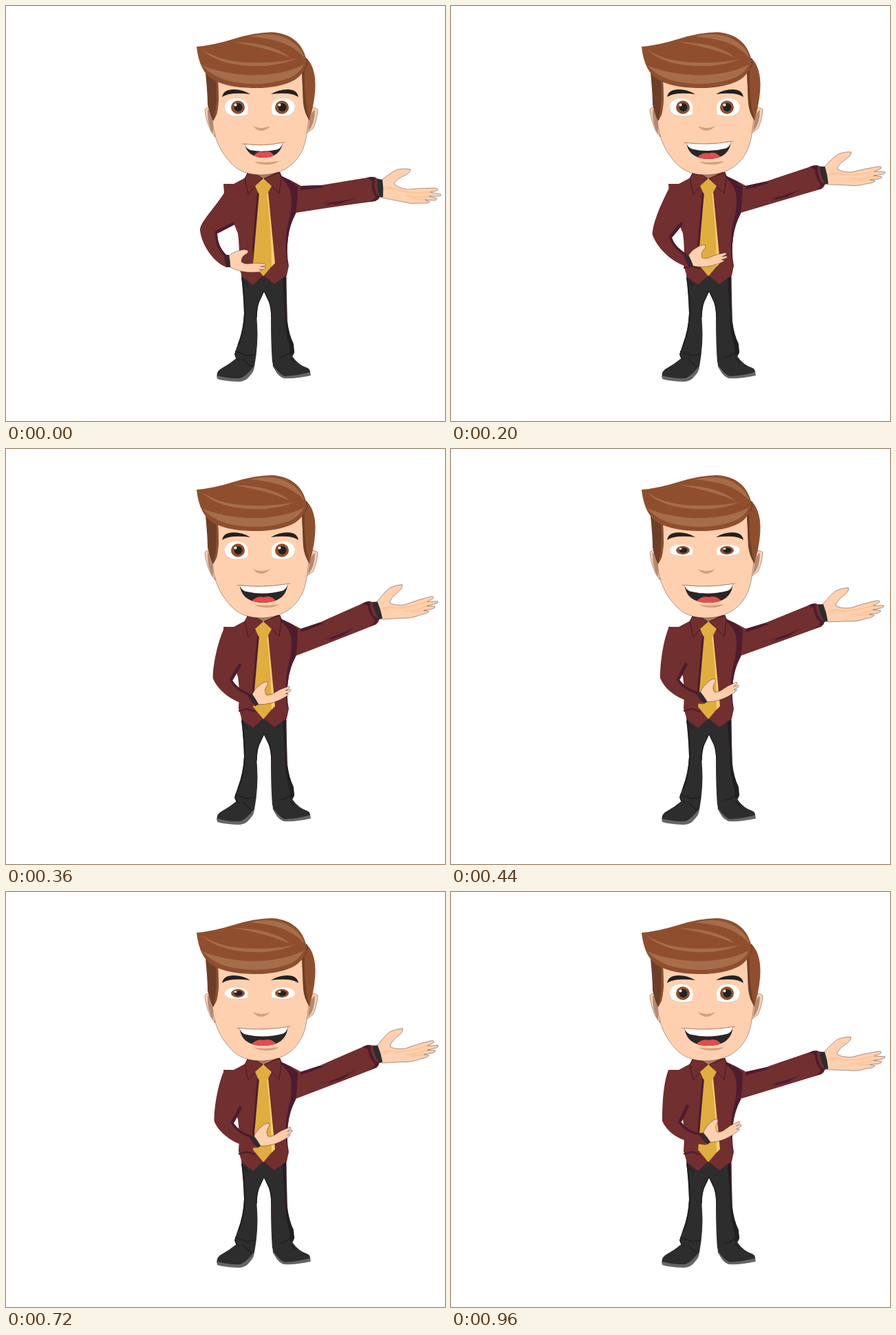
Write an HTML page with a canvas that moves like this. It is 638x602 px and loops after 1.2 s.

```html
<!DOCTYPE html>
<html lang="en">
<head>
<meta charset="utf-8">
<title>Presenter</title>
<style>
html, body { margin: 0; width: 100%; height: 100%; overflow: hidden; background: #fff; }
canvas { display: block; }
</style>
</head>
<body>
<canvas id="stage" width="638" height="602"></canvas>
<script>
const ctx = document.getElementById('stage').getContext('2d');
const LOOP = 1200, STEP = 40, REST = 960;

const skin = '#ffd0b0', tan = '#cfa27c', peach = '#fbc08c', shirt = '#712f2f', plum = '#4d1c30',
  ink = '#2d2d2d', black = '#1f1f1f', hair = '#8f4f2e', hairLight = '#a56d4a',
  hairDark = '#6d3f28', gold = '#dfae3e', goldLight = '#fbcf6f';

const clamp = x => Math.max(0, Math.min(1, x));
const lerp = (a, b, k) => a + (b - a) * k;
const easeOut = (x, p) => 1 - Math.pow(1 - clamp(x), p);

function fill(d, color) {
  ctx.fillStyle = color;
  ctx.fill(new Path2D(d));
}
function line(d, color, width = 1) {
  ctx.strokeStyle = color;
  ctx.lineWidth = width;
  ctx.stroke(new Path2D(d));
}
function shape(d, color, edge = 'rgba(40,25,20,.55)', width = 0.7) {
  fill(d, color);
  line(d, edge, width);
}
function oval(x, y, rx, ry, color) {
  ctx.beginPath();
  ctx.ellipse(x, y, rx, ry, 0, 0, Math.PI * 2);
  ctx.fillStyle = color;
  ctx.fill();
}

// Raised arm: swings up, then sways.
function armAngle(t) {
  if (t > 360) return 12 + 2.5 * Math.cos((t - 360) / 200 * Math.PI);
  const x = t / 360;
  return 14.5 * (0.7 * x + 0.3 * Math.sin(x * Math.PI / 2));
}
// Bent arm: 0 at the hip, 1 in front of the chest.
function bend(t) {
  if (t <= 560) return easeOut(t / 560, 1.5);
  return 1 - 0.083 * (1 - Math.cos((t - 560) / 200 * Math.PI));
}
const eyeOpen = t => clamp((Math.abs(t - 580) - 70) / 110);

function raisedArm(t) {
  const px = 424, py = 265, a = -armAngle(t) * Math.PI / 180;
  const spin = (x, y) => [
    px + (x - px) * Math.cos(a) - (y - py) * Math.sin(a),
    py + (x - px) * Math.sin(a) + (y - py) * Math.cos(a)
  ].join(' ');

  // The sleeve stays fixed at the shoulder and armpit.
  fill(`M408 262L428 261L${spin(458, 260)}Q${spin(500, 253)} ${spin(531, 248)}L${spin(538, 283)}Q${spin(484, 290)} 421 300L408 304Z`, shirt);
  fill(`M424 262L428 261L${spin(458, 260)}L${spin(463, 263)}Q${spin(444, 266)} 424 267Z`, plum);

  ctx.save();
  ctx.translate(px, py);
  ctx.rotate(a);
  ctx.translate(-px, -py);
  shape('M546 252C553 247 560 241 569 237Q580 235 588 237Q588 242 579 246Q566 252 564 258Q570 264 584 266Q602 264 624 264Q630 265 626 268L617 270Q626 272 632 273Q633 276 628 276L615 276L626 279Q627 282 620 282L609 281L616 284Q613 287 603 286Q589 288 576 284Q560 281 546 278Z', skin);
  line('M550 264Q560 261 572 268Q592 272 617 270M582 275Q598 279 615 276M590 279L609 281M553 267Q561 262 566 265', peach, 1.3);
  fill('M538 250L547 252Q549 264 548 277L540 278Z', ink);
  fill('M524 249L529 248Q536 247 540 251Q538 262 543 276Q542 283 534 283L524 284Z', shirt);
  fill('M449 286Q474 286 508 279Q492 284 486 287Q476 287 463 289L470 286Z', plum);
  fill('M526 250Q530 247 537 249Q533 258 538 272L543 277Q540 283 526 284Q536 281 537 277Q530 266 532 254Z', plum);
  ctx.restore();
}

function legs() {
  fill('M342 390Q345 420 346 446Q345 470 337 490L332 505L336 516L361 523Q367 490 365 462Q363 440 368 429L375 414L382 429Q386 440 385 456Q385 490 387 517L414 513L419 503L418 490Q411 476 409 457L407 390Z', ink);
  fill('M402 394L407 392L408 455Q411 476 417 490L419 502L413 508L412 493Q405 472 405 440Z', black);
  line('M407 393Q406 430 408 460', '#432238', 1.2);
  line('M343 394Q347 420 347 446Q346 470 338 492', black, 2);
  line('M375 413L367 430Q364 440 364 452M375 413L383 430Q386 440 386 452M333 501L350 507L363 505M388 513Q402 510 418 500M345 399L352 406', black, 1.5);
  fill('M336 510Q324 520 311 527Q305 532 307 538Q316 543 337 542Q348 541 353 532L361 523L359 511Z', ink);
  fill('M306 536Q324 541 341 540Q350 536 361 522Q361 530 354 537Q348 545 338 545Q316 544 307 541Z', '#666');
  fill('M387 511L388 523Q393 531 403 538Q421 539 442 534Q443 527 438 525Q425 521 416 508Z', ink);
  fill('M388 521Q398 535 405 537Q426 536 442 531L443 536Q422 541 403 540Q392 535 388 521Z', '#666');
  line('M344 512L357 524M333 504Q333 511 340 514M413 510L420 518', black, 1.5);
}

function torso() {
  fill('M316 258L331 258L348 249L351 241L398 241L401 247L414 253L429 261L424 285L421 301Q412 318 410 336Q407 356 411 377L408 391L390 404L374 391L359 405L343 393L338 376Q340 350 337 330L327 305L317 272Z', shirt);
  fill('M399 246L413 253L424 262L423 284L421 301Q412 318 410 336Q407 356 410 380Q403 345 410 315Q417 290 414 271Q411 259 399 249Z', plum);
  line('M338 380L350 377L362 381', plum, 2.2);
  line('M343 393L359 405L374 391L390 404L408 391', plum, 1);
  fill('M361 243H389L374 251Z', '#a77d66');
  fill('M365 270L358 350L360 374L369 270Z', plum);
  fill('M368 270H380L390 373L374 392L359 374Z', gold);
  fill('M379 270H381L391 373L386 378Q386 330 379 270Z', goldLight);
  shape('M352 241L347 250L352 273L373 250L361 243Z', shirt, '#351420', 0.8);
  shape('M398 241L400 249L397 272L375 250L388 245Z', shirt, '#351420', 0.8);
  fill('M374 250L386 261L380 272H367L362 261Z', gold);
}

// Each row: x, y at bend 0, 0.646 and 1.
const armPoints = [
  [317, 271, 319, 258, 316, 258], [302, 295, 306, 283, 308, 278], [281, 314, 296, 318, 307, 312],
  [282, 326, 297, 333, 307, 332], [285, 349, 306, 354, 315, 351], [304, 374, 329, 372, 337, 364],
  [321, 379, 353, 376, 371, 367], [320, 361, 350, 358, 365, 350], [307, 348, 330, 348, 345, 348],
  [307, 329, 325, 335, 334, 333], [332, 316, 339, 314, 345, 310]
];
function blend(a, b, c, u) {
  const m = 0.646;
  return a * (u - m) * (u - 1) / m + b * u * (u - 1) / (m * (m - 1)) + c * u * (u - m) / (1 - m);
}
function bentArm(t) {
  const u = bend(t);
  const p = armPoints.map(r => [0, 1].map(i => blend(r[i], r[i + 2], r[i + 4], u)).join(' '));
  const inner = `${p[7]}Q${p[8]} ${p[9]}L${p[10]}`;
  const sleeve = `M${p[0]}C${p[1]} ${p[2]} ${p[3]}C${p[4]} ${p[5]} ${p[6]}L${inner}L335 268Z`;
  fill(sleeve, shirt);
  ctx.save();
  ctx.clip(new Path2D(sleeve));
  line('M' + inner, plum, 7);
  ctx.restore();
  line(`M${p[9]}L${p[10]}`, plum, 2.5);

  ctx.save();
  ctx.translate(blend(323, 354, 370, u), blend(370, 367, 357, u));
  ctx.rotate(blend(0, -21.7, -31, u) * Math.PI / 180);
  shape('M1 -8Q8 -14 15 -15Q24 -18 29 -15Q29 -11 24 -9Q19 -6 19 1Q22 4 28 4L40 3L53 4Q56 5 53 7L47 8L54 9Q55 12 51 12L45 12L49 14Q47 16 42 16Q29 17 20 15Q10 13 3 9Z', skin);
  line('M18 2Q20 5 28 6L47 8M30 10L45 12', peach, 1.2);
  fill('M-4 -9L1 -9Q3 0 3 9L-2 9Z', ink);
  line('M-5 -9Q-4 1 -2 9', plum, 2);
  ctx.restore();
}

function eye(x, iris, side, open) {
  ctx.save();
  ctx.translate(x, 147);
  ctx.scale(side, open);
  fill('M-17 0C-16 -9 -9 -13 0 -13C10 -13 17 -8 17 1L16 11Q8 14 -2 13C-11 12 -17 8 -17 0Z', '#fff');
  line('M-17 0C-17 8 -11 12 -2 13Q8 14 16 11', '#e3c6b4', 1);
  ctx.restore();
  ctx.save();
  ctx.translate(iris, 147);
  ctx.scale(1, open);
  oval(0, 0, 10, 9.7, hair);
  oval(0.5, 0, 6, 6, '#222');
  oval(-3.5, -3.5, 2, 2, '#fff');
  ctx.restore();
}

function mouth(t) {
  const k = easeOut(t / 400, 1.4);
  const w = lerp(27.5, 35, k), y = lerp(200, 197.5, k), b = lerp(220, 223, k);
  const cx = 374.5, l = cx - w, r = cx + w, e = w * 0.58;
  const lips = `M${l} ${y}Q${cx} ${y + 4} ${r} ${y - 2}C${r - 1} ${b - 9} ${cx + e} ${b} ${cx} ${b}C${cx - e} ${b} ${l + 2} ${b - 8} ${l} ${y}Z`;
  fill(lips, '#2b2629');
  ctx.save();
  ctx.clip(new Path2D(lips));
  fill(`M${l} ${y}Q${cx} ${y + 4} ${r} ${y - 2}Q${r - 1} ${y + 5} ${r - 7} ${y + 8}Q${cx} 213 ${l + 8} ${y + 9}Q${l + 1} ${y + 6} ${l} ${y}Z`, '#fff');
  fill(`M${cx - e} ${b}Q${cx - 10} ${b - 11} ${cx} ${b - 8}Q${cx + 12} ${b - 12} ${cx + e} ${b}Z`, '#e24d4d');
  ctx.restore();
  line(`M${l - 4} ${y}L${l} ${y}Q${cx} ${y + 4} ${r} ${y - 2}L${r + 3.5} ${y - 2.5}`, '#b78361', 1);
  fill('M361 226Q379 228 397 225Q391 230 379 230Q367 230 361 226Z', tan);
}

function head(t) {
  shape('M303 147Q292 145 289 150Q290 165 298 182L304 190Z', skin);
  shape('M438 148Q449 146 453 150Q452 166 446 178L436 185Z', skin);
  fill('M293 150Q301 152 301 187Q292 170 293 150Z', '#b18a73');
  fill('M449 151Q442 152 439 182Q449 171 449 151Z', '#b18a73');
  shape('M298 100L300 165C302 192 311 211 327 228C340 242 356 245 373 245C395 244 413 236 425 219C436 204 437 187 440 164L437 90Z', skin);

  fill('M290 97Q293 128 293 143Q297 160 301 167Q308 157 309 136L308 106Z', hairDark);
  fill('M305 106L308 108Q310 145 306 158L301 167Q308 142 305 106Z', hair);
  fill('M432 72Q446 81 449 104Q451 121 446 146L441 167Q434 153 432 140L430 94Z', hair);
  fill('M430 95L434 91Q433 137 441 166Q433 155 432 140Z', hairDark);
  fill('M277 59Q301 57 330 48Q362 38 386 38C412 39 432 53 437 80Q435 97 420 107Q397 120 357 119Q322 118 303 108Q281 97 277 59Z', hair);
  fill('M285 86Q310 97 350 100Q399 102 433 85Q426 99 410 105Q374 117 337 111Q304 107 285 86Z', hairLight);
  fill('M354 44Q390 36 411 49Q429 59 434 75Q417 57 395 51Q377 46 354 44Z', hairLight);
  fill('M285 63Q313 82 358 82Q397 83 422 76Q389 91 343 86Q304 82 285 63Z', hairLight);
  fill('M329 52Q368 53 390 62Q405 67 412 75Q383 61 329 52Z', hairLight);
  line('M434 91Q439 86 437 76', hairDark, 1.5);

  fill('M314 132Q316 121 331 121Q344 121 355 128Q342 126 330 127Q320 128 314 132Z', '#24201f');
  fill('M425 132Q423 121 409 121Q396 121 385 128Q398 126 410 127Q419 128 425 132Z', '#24201f');

  const open = eyeOpen(t);
  if (open > 0.2) {
    eye(334.5, 337, 1, open);
    eye(403, 401, -1, open);
  } else {
    line('M321 149Q336 137 354 148M386 146Q402 135 419 146', '#3b2a22', 1.4);
  }
  fill('M359 174Q371 180 384 174Q378 181 371 181Q364 181 359 174Z', tan);
  mouth(t);
}

function draw(now) {
  const t = Math.min(Math.floor(now % LOOP / STEP) * STEP, REST);
  ctx.fillStyle = '#fff';
  ctx.fillRect(0, 0, 638, 602);
  raisedArm(t);
  legs();
  torso();
  bentArm(t);
  head(t);
}

const start = performance.now();
function tick() {
  draw(performance.now() - start);
  requestAnimationFrame(tick);
}
tick();
</script>
</body>
</html>
```
